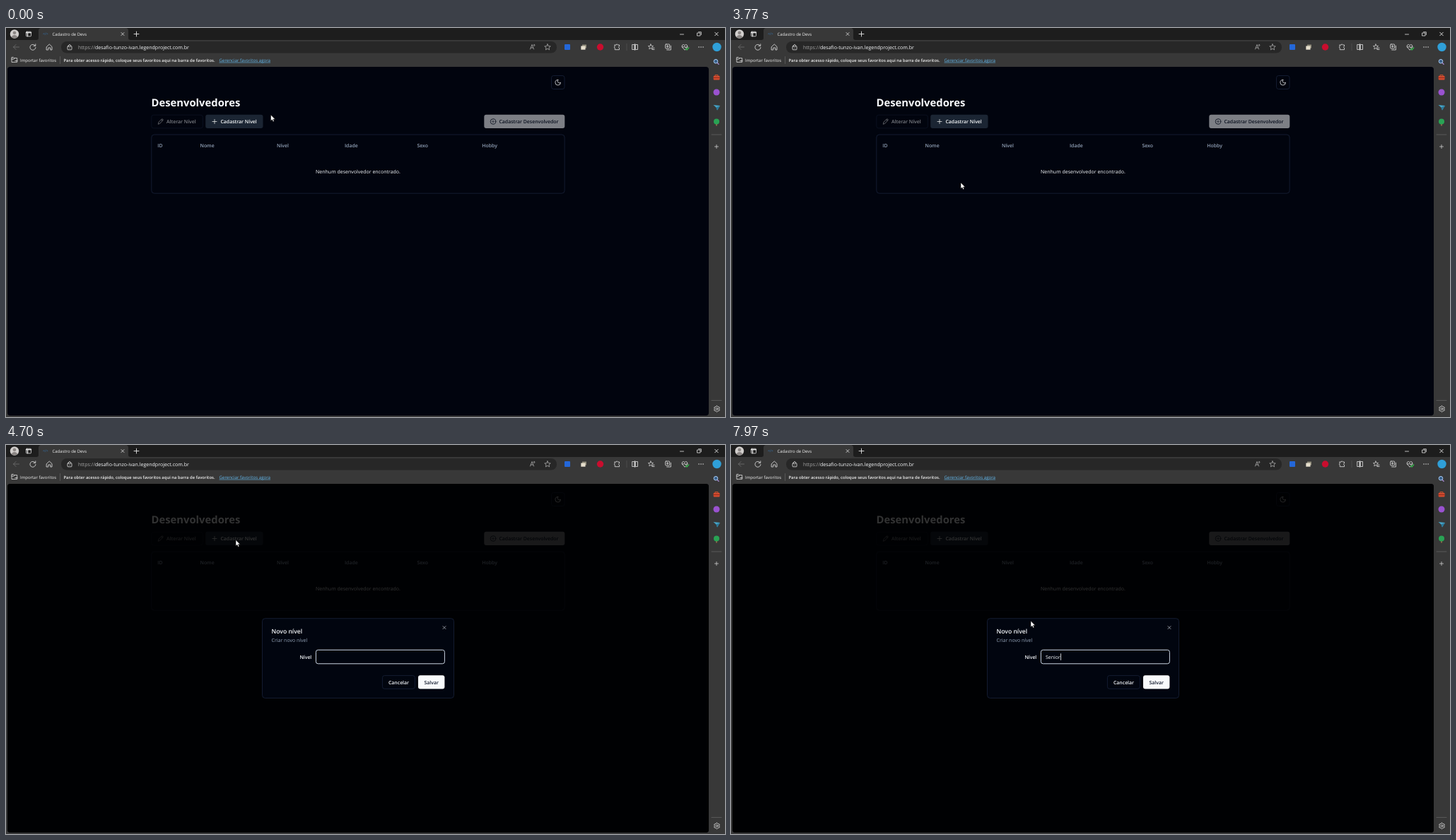
These frames come from a looping animation (1017 by 551 pixels, 8000 ms). An HTML page:

```html
<!DOCTYPE html>
<html lang="pt-BR">
<head>
<meta charset="utf-8">
<title>Cadastro de Devs</title>
<style>
  html, body { margin: 0; height: 100%; overflow: hidden; background: #383838; }
  svg { display: block; width: 100vw; height: 100vh; }
  text {
    font: 7px "Open Sans", "Noto Sans", sans-serif; fill: #f8fafc;
    white-space: pre; text-rendering: geometricPrecision;
  }
  .ui { font-size: 6px; fill: #f0f0f0; }
  .semi { font-weight: 600; font-size: 6.9px; }
  .mid { text-anchor: middle; }
  .muted, .muted text { fill: #94a3b8; }
  .dark { fill: #0f172a; }
  .line { fill: none; stroke: #e4e4e4; stroke-width: .8; stroke-linecap: round; stroke-linejoin: round; }
  .edge { fill: none; stroke: #19233a; stroke-width: .8; }
</style>
</head>
<body>
<svg viewBox="0 0 1017 551" preserveAspectRatio="none">
  <defs>
    <path id="star" d="M0-4.2 1.2-1.4 4.2-1.1 2 .9 2.6 3.9 0 2.3-2.6 3.9-2 .9-4.2-1.1-1.2-1.4z"/>
    <path id="plus" d="M-3 0H3M0-3V3"/>
    <path id="cross" d="M-2-2 2 2M2-2-2 2"/>
    <path id="pencil" d="M-3.4 3.4-2.6.6 1.8-3.5Q3.2-4 3.5-2.3L-.7 2.5zM1-2.7 2.6-1.1"/>
    <path id="moon" d="M0-3.8A2.7 2.7 0 0 0 3.8 0 3.8 3.8 0 1 1 0-3.8z"/>
  </defs>

  <!-- browser frame -->
  <rect width="1017" height="551" fill="#383838"/>
  <rect width="1017" height="17" fill="#1d1d1d"/>
  <path d="M43 17Q46 17 46 14V4Q46 0 50 0H169Q173 0 173 4V14Q173 17 176 17z" fill="#383838"/>
  <rect x="78" y="19" width="701" height="16.5" rx="8" fill="#272727"/>

  <circle cx="12" cy="8.5" r="6.2" fill="#d2cfcd"/>
  <circle cx="12" cy="6.7" r="2.3" fill="#8a8583"/>
  <path d="M7.5 12.7Q12 7 16.5 12.7Q12 16.5 7.5 12.7z" fill="#8a8583"/>
  <g class="line">
    <rect x="28.5" y="5.2" width="7" height="6.6" rx="1"/>
    <path d="M28.5 6.5H35.5M30.5 6.5V11.5" stroke-width="1.4"/>
    <use href="#cross" x="165" y="8.5"/>
    <use href="#plus" transform="translate(184.5 8.5) scale(1.15)"/>
    <path d="M953.5 9H958.5M978 7H982V11H978zM979.5 5.7H983.3V9.5"/>
    <use href="#cross" transform="translate(1005 8.5) scale(1.15)"/>
    <path d="M18.5 27H10.5M14 23.5 10.5 27 14 30.5" stroke="#707070"/>
    <path d="M41.3 25A4 4 0 1 0 42 27.5M41.8 22.8V25.4H39"/>
    <path d="M57.5 26.5 61.3 23 65 26.5V31H62.8V28H59.8V31H57.5z"/>
    <rect x="87" y="25.8" width="6" height="5" rx=".8"/>
    <path d="M88.3 25.8V24.7Q90 21.7 91.7 24.7V25.8M90 28V28.5"/>
    <path d="M741.5 30 744 23.5 746.5 30M742.3 28H745.7M747.5 23.2Q748.7 24.2 747.5 25.5M746.3 23.8V25" stroke="#aaa"/>
    <use href="#star" x="766" y="27" stroke="#aaa"/>
    <path d="M861 24H863.2Q864 21.5 865.4 24H867.5V26Q865 27 867.5 28.2V30.7H861.2V28.4Q859.2 27 861 26z"/>
    <path d="M878 22.5V31.5" stroke="#555"/>
    <path d="M888.5 23.5H885.7V30.5H888.5zM890.7 23.5H893.5V30.5H890.7zM889.6 22.5V31.5"/>
    <use href="#star" transform="translate(912 26.5) scale(.85)"/>
    <path d="M914.7 28.3H917M914 30.5H917"/>
    <rect x="932.7" y="23" width="6" height="6" rx="1"/>
    <path d="M934.7 31H940.4V25.2M935.7 24.6V27.4M934.3 26H937.1"/>
    <path d="M960 31 956.5 27.3C955 24.5 958.2 22 960 24.6 961.8 22 965 24.5 963.5 27.3zM956.5 27H958.7L959.7 25.7 961 28 961.8 27H964"/>
    <path d="M980 27h.1M983 27h.1M986 27h.1" stroke-width="1.3"/>
    <path d="M8 48V41.5H10.5L11.7 42.7H15.7V48zM8 44H11L12 42.7M13 46.5H16"/>
    <path d="M76.5 40.5V50.5M998 151H1012M998 527.5H1012" stroke="#606060"/>
    <use href="#plus" transform="translate(1005 168) scale(.85)"/>
    <circle cx="1005.5" cy="539.5" r="1.4"/>
    <path d="M1005.5 535.2 1007 536.5 1009.2 537.3 1008.8 539.5 1009.2 541.7 1007 542.5 1005.5 543.8 1004 542.5 1001.8 541.7 1002.2 539.5 1001.8 537.3 1004 536.5z"/>
  </g>
  <path d="M961 29 963 31 966 27.5" fill="none" stroke="#35b54a" stroke-width="1.4"/>
  <rect x="790" y="23" width="8" height="8" rx="1" fill="#2467d9"/>
  <path d="M815 23.5H821V28.5H815z" fill="#8c8878"/>
  <path d="M813.3 25.5H819.5V30.7H813.3z" fill="#e6dfcd"/>
  <circle cx="840.5" cy="27" r="4.7" fill="#c90d2e"/>
  <circle cx="1005.5" cy="27" r="6.2" fill="#2f9fd8"/>

  <!-- sidebar -->
  <circle cx="1004" cy="47.2" r="2.8" fill="#39618c" stroke="#a6c8ed"/>
  <path d="M1006 49.3 1008.5 51.8" stroke="#a98bd4" stroke-width="1.3"/>
  <path d="M1003 68V66.5H1007V68" fill="none" stroke="#c4502e"/>
  <rect x="1000.7" y="67.8" width="8.8" height="5.8" rx="1" fill="#d64b2e"/>
  <path d="M1000.7 70.5H1009.5" stroke="#8c2a1c"/>
  <circle cx="1005" cy="91" r="4.5" fill="#9a52d0"/>
  <path d="M1000.5 109 1010 110 1006 116.5 1004.5 112.5z" fill="#47a6c9"/>
  <path d="M1004.5 112.5 1010 110 1006 116.5z" fill="#2b7898"/>
  <path d="M1005 133V138.5" stroke="#a9744a" stroke-width="1.5"/>
  <circle cx="1005" cy="132.5" r="4" fill="#29a354"/>

  <text x="52" y="10.3" style="font-size:5px;fill:#3579b8">&lt;/&gt;</text>
  <text class="ui" x="65.5" y="10.7">Cadastro de Devs</text>
  <text x="102" y="29.6" style="font-size:7.05px"><tspan fill="#a5a5a5">https://</tspan>desafio-tunzo-ivan.legendproject.com.br</text>
  <text class="ui" x="20" y="47.7">Importar favoritos</text>
  <text class="ui" x="81.5" y="47.7" style="font-weight:600;font-size:5.9px">Para obter acesso rápido, coloque seus favoritos aqui na barra de favoritos.</text>
  <text x="301.5" y="47.7" style="font-size:6.15px;fill:#62b5e8;text-decoration:underline">Gerenciar favoritos agora</text>

  <!-- page -->
  <rect x="2" y="55" width="992" height="494" rx="4" fill="#01040e"/>
  <rect class="edge" x="771.5" y="67.5" width="18.5" height="19" rx="3"/>
  <use class="line" href="#moon" x="780.7" y="77.2"/>
  <text x="205.5" y="111" style="font-weight:700;font-size:14.8px">Desenvolvedores</text>
  <g opacity=".5">
    <rect class="edge" x="205.8" y="123.2" width="72.5" height="18.7" rx="3"/>
    <use class="line" href="#pencil" x="218.7" y="132.5"/>
    <text class="semi" x="227" y="135">Alterar Nível</text>
    <rect x="676.3" y="122.8" width="114" height="19.3" rx="3" fill="#f8fafc"/>
    <g class="line" style="stroke:#0f172a">
      <circle cx="689" cy="132.5" r="3.8"/>
      <use href="#plus" transform="translate(689 132.5) scale(.6)"/>
    </g>
    <text class="semi dark" x="697.5" y="135">Cadastrar Desenvolvedor</text>
  </g>
  <rect x="282.2" y="122.8" width="81.3" height="19.3" rx="3" fill="#1b2533"/>
  <use class="line" href="#plus" x="295" y="132.5"/>
  <text class="semi" x="303.5" y="135">Cadastrar Nível</text>
  <rect class="edge" x="205.8" y="151" width="584.3" height="83.2" rx="4"/>
  <g class="muted">
    <text class="semi" x="214.3" y="168.6">ID</text>
    <text class="semi" x="274.5" y="168.6">Nome</text>
    <text class="semi" x="383" y="168.6">Nível</text>
    <text class="semi" x="479" y="168.6">Idade</text>
    <text class="semi" x="581.5" y="168.6">Sexo</text>
    <text class="semi" x="673.3" y="168.6">Hobby</text>
  </g>
  <text class="mid" x="498" y="205.5">Nenhum desenvolvedor encontrado.</text>

  <rect id="overlay" x="2" y="55" width="992" height="494" rx="4"/>
  <g id="dialog">
    <rect class="edge" x="362.5" y="245.7" width="271" height="112.8" rx="4" style="fill:#01050f"/>
    <text x="375.5" y="267" style="font-weight:600;font-size:8.6px">Novo nível</text>
    <text class="muted" x="375.5" y="279.3">Criar novo nível</text>
    <use class="line" href="#cross" x="620" y="258.6" style="stroke:#aeb3bb"/>
    <text class="semi" x="432.3" y="302.6" text-anchor="end">Nível</text>
    <rect x="438.4" y="290.3" width="182" height="19.5" rx="3" fill="none" stroke="#cbd5e1"/>
    <text id="field" x="445" y="302.8"></text>
    <rect id="caret" y="295.3" width=".8" height="9.6" fill="#f8fafc"/>
    <rect class="edge" x="532.4" y="326.6" width="46" height="18.7" rx="3"/>
    <text class="semi mid" x="555.5" y="338.6">Cancelar</text>
    <rect x="583" y="326.3" width="37.4" height="19.2" rx="3" fill="#f8fafc"/>
    <text class="semi dark mid" x="601.7" y="338.6">Salvar</text>
  </g>
  <path id="cursor" d="M0 0V8.6L2 6.8 3.3 9.8 4.8 9.1 3.5 6.2H6.2z" fill="#fff" stroke="#000" stroke-width=".5"/>
</svg>
<script>
  const LOOP = 8000, OPEN = 4600, TYPE_START = 6500, KEY_GAP = 200, WORD = 'Senior';
  const [overlay, dialog, field, caret, cursor] =
    ['overlay', 'dialog', 'field', 'caret', 'cursor'].map(id => document.getElementById(id));

  // time, x, y of the pointer tip
  const track = [
    [30, 374.5, 123], [1560, 162, 505], [1970, 162, 505], [2100, 177, 556], [2300, 177, 556],
    [3100, 318, 213], [3250, 328, 227], [3430, 325, 219], [3770, 325, 219],
    [4450, 325, 134.5], [4850, 325, 134.5], [5600, 424, 249.3]
  ];
  const clamp = v => Math.min(1, Math.max(0, v));
  const smooth = v => v * v * (3 - 2 * v);

  function pointerAt(t) {
    const i = track.findIndex(k => k[0] > t);
    if (i < 0) return track.at(-1).slice(1);
    const b = track[i], a = track[i - 1] || b;
    const p = a === b ? 0 : smooth((t - a[0]) / (b[0] - a[0]));
    return [a[1] + (b[1] - a[1]) * p, a[2] + (b[2] - a[2]) * p];
  }

  function draw(t) {
    cursor.setAttribute('transform', `translate(${pointerAt(t)})`);

    // the dialog first shows part-way through its zoom
    const shown = t < OPEN ? 0 : 1 - .38 * (1 - clamp((t - OPEN) / 100)) ** 2;
    overlay.setAttribute('opacity', .8 * shown);
    dialog.setAttribute('opacity', shown);
    dialog.setAttribute('transform',
      `translate(498 ${302 + 2.2 * (1 - shown)}) scale(${.95 + .05 * shown}) translate(-498 -302)`);

    const typed = Math.min(WORD.length, Math.max(0, Math.floor((t - TYPE_START) / KEY_GAP) + 1));
    field.textContent = WORD.slice(0, typed);
    const blinkStart = typed ? TYPE_START + (typed - 1) * KEY_GAP : 4750;
    const on = t >= blinkStart && (t - blinkStart) % 1000 < 500;
    caret.setAttribute('visibility', on ? 'visible' : 'hidden');
    caret.setAttribute('x', 445.3 + (typed ? field.getComputedTextLength() : 0));
  }

  const start = performance.now();
  function tick() {
    draw((performance.now() - start) % LOOP);
    requestAnimationFrame(tick);
  }
  tick();
</script>
</body>
</html>
```
